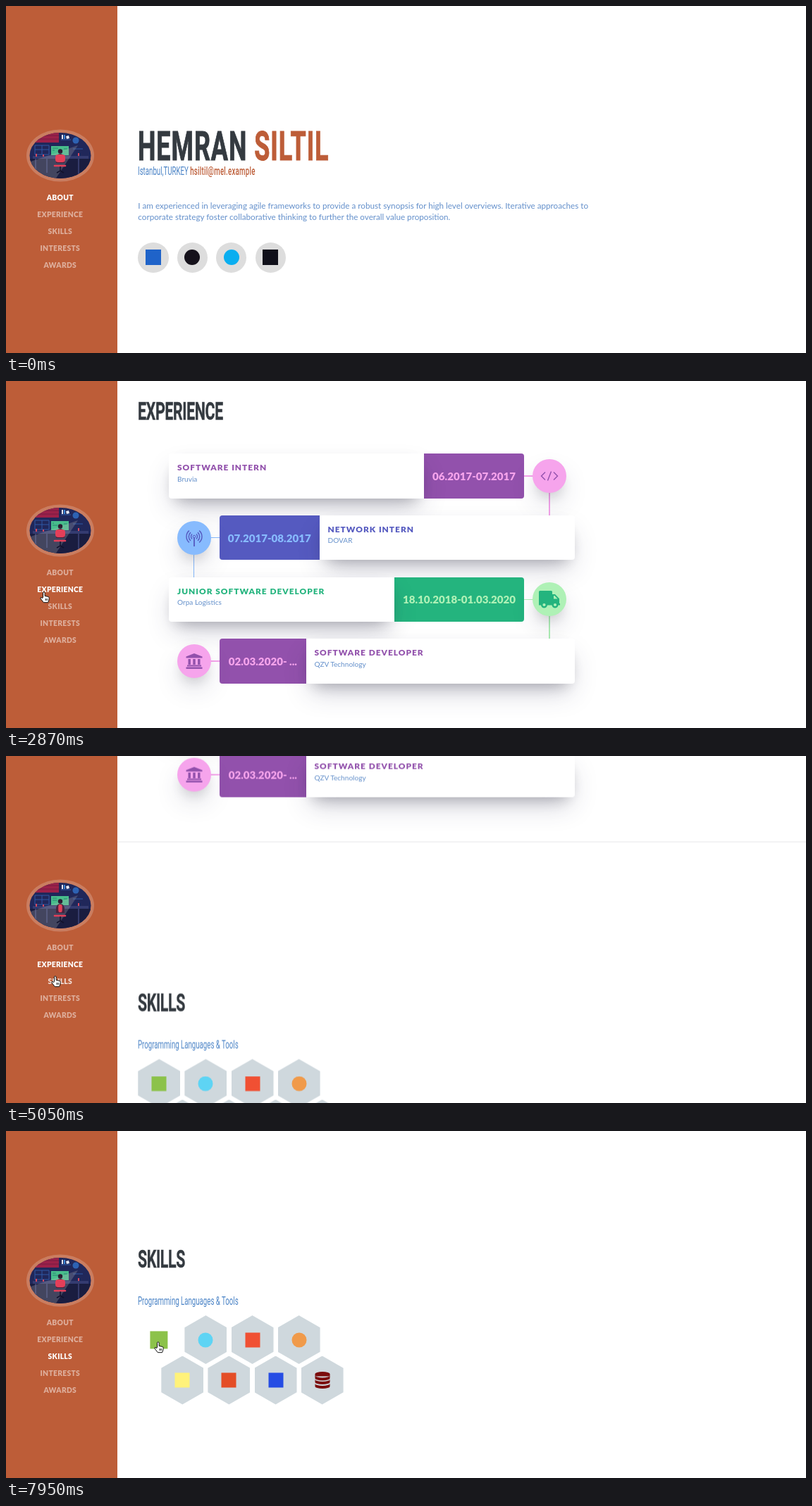
An HTML page for the animation above (8 s loop, 1135 px wide and 493 px high).

```html
<!DOCTYPE html>
<html lang="en">
<head>
<meta charset="utf-8">
<title>Resume</title>
<style>
html, body { margin: 0; width: 100%; height: 100%; overflow: hidden; background: #fff; }
body { position: relative; font-family: Lato, sans-serif; color: #6490cb; }
div, span.t, svg { position: absolute; }
svg { overflow: visible; }
#page { left: 0; top: 0; width: 1135px; will-change: transform; }
#side { left: 0; top: 0; width: 158px; height: 100%; background: #bd5d38; }
/* zero line height: "top" is the middle of the capitals */
.t { line-height: 0; white-space: pre; }
.mid { transform: translateX(-50%); }
.cond { font-family: Roboto, sans-serif; transform: scaleX(.62); transform-origin: 0 0; }
.name { font-size: 58px; font-weight: 700; letter-spacing: 1.5px; color: #343a40; -webkit-text-stroke: 1px; }
.head { font-size: 34.5px; font-weight: 700; letter-spacing: -.6px; color: #343a40; -webkit-text-stroke: .4px; }
.sub { font-size: 15.6px; color: #4a83c6; }
.rust { color: #bd5d38; }
.sub .rust { font-weight: 500; letter-spacing: .4px; }
.para { font-size: 11.68px; }
.nav { font-size: 10.3px; font-weight: 900; letter-spacing: .3px; color: #fff; }
.title { font-size: 11.9px; font-weight: 900; letter-spacing: 1px; }
.org { font-size: 10.1px; }
.date { font-size: 15.1px; font-weight: 900; }
.dot { border-radius: 50%; }
.hex { clip-path: polygon(50% 0, 100% 25%, 100% 75%, 50% 100%, 0 75%, 0 25%); }
.lift { box-shadow: 0 18px 36px -7px rgba(50,50,93,.25), 0 11px 22px -11px rgba(0,0,0,.3), 0 -7px 22px -5px rgba(0,0,0,.025); }
</style>
</head>
<body>
<div id="page"></div>
<div id="side">
  <svg width="158" height="493">
    <clipPath id="oval"><ellipse cx="77" cy="212.5" rx="43.5" ry="32.5"/></clipPath>
    <ellipse cx="77" cy="212.5" rx="48" ry="37" fill="#fff" fill-opacity=".2"/>
    <g clip-path="url(#oval)">
      <path d="M33 180h88v66H33z" fill="#20275a"/>
      <path d="M33 180h42v14H33z" fill="#9c2149"/>
      <path d="M33 184h42M33 189h42" stroke="#741a42"/>
      <path d="M78 190h14M41 198h20v13H41zM41 204h20M51 198v13M95 203h14" fill="none" stroke="#2f58a5"/>
      <path d="M79 183h2v6h-2zM85 185l4-1 1 4-4 1z" fill="#e6e9f5"/>
      <path d="M82 183h2v6h-2z" fill="#3d86d6"/>
      <circle cx="99" cy="191" r="4.5" fill="#2e62b3"/>
      <path d="M64 199h25v13H64z" fill="#48bd8c"/>
      <path id="code" d="M66 202h8M66 205h5M82 203h5" stroke="#2b8270"/>
      <path d="M38 213h79v4H38z" fill="#343b70"/>
      <path d="M33 217h88v30H33z" fill="#1a1d40"/>
      <path d="M42 217v22M58 217v20M103 217v22" stroke="#353b6b" stroke-width="2"/>
      <path d="M43 210v4M53 211v3M103 209v4" stroke="#d84960" stroke-width="2"/>
      <path d="M102 198L35 221 33 246H70z" fill="#b9b4b4" fill-opacity=".26"/>
      <path d="M71 218q0-8 6-8t6 8v5H71z" fill="#47233f"/>
      <circle cx="77" cy="206.5" r="3.2" fill="#2a1c32"/>
      <rect id="chair" x="70" y="211" width="14" height="11" rx="4" fill="#e33f59"/>
      <path d="M69 227h15" stroke="#e33f59" stroke-width="2.6" stroke-linecap="round"/>
      <path d="M77 228v7M72 237l5-3 5 3" fill="none" stroke="#11122b" stroke-width="1.5"/>
    </g>
  </svg>
</div>
<svg id="cursor" width="1" height="1" fill="#fff" stroke="#111" stroke-linejoin="round">
  <path id="arrow" d="M0 0v12l2.8-2.6 1.9 4.3 1.9-.9-1.9-4.1h3.8z"/>
  <path id="hand" d="M-1.5 7V1.2Q-1.5-.2-.2-.2T1.1 1.2V5.4l4.6 1q1.6.4 1.5 2L6.6 12l-1 2.7H-.7L-4.8 9.3q-.9-1.6.7-2l1.8 1.4zM2.2 9v3M4.2 9v3"/>
</svg>
<script>
const LOOP = 8000, EXP = 500, SKILLS = 1040;
const $ = id => document.getElementById(id);
const text = (x, y, cls, str, style = '') =>
  `<span class="t ${cls}" style="left:${x}px;top:${y}px;${style}">${str}</span>`;
const box = (x, y, w, h, color, cls = '', style = '') =>
  `<div class="${cls}" style="left:${x}px;top:${y}px;width:${w}px;height:${h}px;background:${color};${style}"></div>`;
// plain mark, centred on x, y
const mark = (x, y, size, color, round, id = '') =>
  `<svg id="${id}" style="left:${x}px;top:${y}px" width="1" height="1" fill="${color}">` +
  `<rect x="${-size / 2}" y="${-size / 2}" width="${size}" height="${size}" rx="${round ? size / 2 : 0}"/></svg>`;

const icons = {
  code: '<path d="M-6-5.5L-11.5 0-6 5.5M6-5.5L11.5 0 6 5.5M2.5-6.5L-2.5 6.5" stroke-width="1.4"/>',
  mast: '<circle cy="-2" r="1.8"/><path d="M0 0V12" stroke-width="1.8"/>' +
    [4.5, 7.7, 11].map(r => [-1, 1].map(s =>
      `<path d="M${s * r * .65} ${-2 - r * .76}A${r} ${r} 0 0 ${s > 0 ? 1 : 0} ${s * r * .65} ${-2 + r * .76}" stroke-width="1.4"/>`).join('')).join(''),
  truck: '<g stroke="none" fill="#24b47e"><path d="M-13.5-12H2.5q1.5 0 1.5 1.5V-7H8l6 6.2V6h1v2.5H-15V-10.5q0-1.5 1.5-1.5z"/>' +
    '<path d="M6-5H7.3L11.5-.5H6z" fill="#aff1b6"/>' +
    '<g stroke="#24b47e" stroke-width="2.4" fill="#aff1b6"><circle cx="-7.5" cy="8" r="3.3"/><circle cx="8" cy="8" r="3.3"/></g></g>',
  bank: '<g stroke="none" fill="#9251ac"><path d="M0-11L11.5-6.5V-4.5H-11.5V-6.5z"/>' +
    '<path d="M-8.5-3h3.4v8h-3.4zM-1.7-3h3.4v8h-3.4zM5.1-3h3.4v8H5.1zM-10 5.5h20v2h-20zM-11.5 8.5h23v2.5h-23z"/></g>'
};
const purple = ['#9251ac', '#f6a4ec'], blue = ['#555ac0', '#87bbfe'], green = ['#24b47e', '#aff1b6'];
const jobs = [
  ['SOFTWARE INTERN', 'Bruvia', '06.2017-07.2017', 142, purple, 'code'],
  ['NETWORK INTERN', 'DOVAR', '07.2017-08.2017', 141.5, blue, 'mast'],
  ['JUNIOR SOFTWARE DEVELOPER', 'Orpa Logistics', '18.10.2018-01.03.2020', 184, green, 'truck'],
  ['SOFTWARE DEVELOPER', 'QZV Technology', '02.03.2020- ...', 122.5, purple, 'bank']
];

function job([title, org, date, dateW, [dark, light], icon], i) {
  const odd = i % 2, y = EXP + 103.3 + i * 87.65, h = 63.5, mid = y + h / 2;
  const left = odd ? 303 : 231, width = 504 - dateW;
  const dateX = odd ? left : left + width, cardX = odd ? left + dateW : left;
  const cx = odd ? 266.5 : 771;
  const round = right => `border-radius:${right ? '0 4px 4px 0' : '4px 0 0 4px'}`;
  return (i < 3 ? box(cx - .75, mid + 24, 1.5, 32, light) : '') +
    box(odd ? 290 : 735, mid - .75, 13, 1.5, light) +
    box(dateX, y, dateW, h, dark, '', round(!odd)) +
    box(cardX, y, width, h, '#fff', 'lift', round(odd)) +
    text(dateX + dateW / 2, mid, 'mid date', date, `color:${light}`) +
    text(cardX + 12, y + 20, 'title', title, `color:${dark}`) +
    text(cardX + 12, y + 35.5, 'org', org) +
    box(cx - 24, mid - 24, 48, 48, light, 'dot lift') +
    `<svg style="left:${cx}px;top:${mid}px" width="1" height="1" fill="none" stroke="${dark}">${icons[icon]}</svg>`;
}

const social = [['#1f63c9', 0], ['#15111b', 1], ['#09aef0', 1], ['#10101a', 0]];
const skills = [['#8cc24a', 0], ['#5ed4f4', 1], ['#f05033', 0], ['#f09a4a', 1],
  ['#fff27a', 0], ['#e44d26', 0], ['#264de4', 0]];
const hexAt = i => [(i < 4 ? 187.3 : 220.3) + i % 4 * 66.1, SKILLS + (i < 4 ? 262 : 319.5)];

const disk = y => `<path d="M-10.5 ${y}a10.5 3 0 0 0 21 0v4a10.5 3 0 0 1-21 0z"/>`;
$('page').innerHTML =
  text(187, 198.5, 'cond name', 'HEMRAN <span class="rust">SILTIL</span>') +
  text(187, 235, 'cond sub', 'Istanbul,TURKEY <span class="rust">hsiltil@mel.example</span>') +
  text(187.3, 282.5, 'para', 'I am experienced in leveraging agile frameworks to provide a robust synopsis for high level overviews. Iterative approaches to') +
  text(187.3, 299, 'para', 'corporate strategy foster collaborative thinking to further the overall value proposition.') +
  social.map(([color, round], i) =>
    box(187.3 + i * 55.4, 335.5, 43.4, 43.4, '#dddddd', 'dot') + mark(209 + i * 55.4, 357.2, 22, color, round)).join('') +
  box(158, 493, 977, 1, '#e6e6e8') +
  text(187, EXP + 42.5, 'cond head', 'EXPERIENCE') +
  jobs.map(job).join('') +
  box(158, 993, 977, 1, '#e6e6e8') +
  text(187, SKILLS + 182, 'cond head', 'SKILLS') +
  text(187, SKILLS + 241.5, 'cond sub', 'Programming Languages &amp; Tools') +
  Array.from({ length: 8 }, (_, i) => box(...hexAt(i), 60, 69, '#cfd8dd', 'hex')).join('') +
  skills.map(([color, round], i) => {
    const [x, y] = hexAt(i);
    return mark(x + 30, y + 34.5, 21, color, round, 'skill' + i);
  }).join('') +
  `<svg style="left:448.6px;top:${SKILLS + 354}px" width="1" height="1" fill="#7b0d0d">` +
  `<ellipse cy="-9" rx="10.5" ry="3"/><path d="M-10.5-9h21v3.5h-21z"/>${[-6.5, -1, 5].map(disk).join('')}</svg>`;

const names = ['ABOUT', 'EXPERIENCE', 'SKILLS', 'INTERESTS', 'AWARDS'];
$('side').insertAdjacentHTML('beforeend',
  names.map((n, i) => text(76.8, 271.5 + i * 24, 'mid nav', n)).join(''));
const links = document.querySelectorAll('.nav');
const firstHex = document.querySelector('.hex');

const clamp = v => Math.min(1, Math.max(0, v));
const smooth = (t, a, b) => { const p = clamp((t - a) / (b - a)); return p * p * (3 - 2 * p); };
function expo(p) {
  if (p <= 0) return 0;
  if (p >= 1) return 1;
  return p < .5 ? 2 ** (20 * p - 11) : 1 - 2 ** (9 - 20 * p);
}

// pointer tip: time, x, y
const track = [[70, 732, 466], [950, 92, 312], [1250, 54, 299.5], [3500, 54, 299.5],
  [4150, 70, 313], [6100, 70, 313], [6800, 216, 300]];
function pointer(t) {
  let [, x, y] = track[0];
  for (let i = 1; i < track.length; i++) {
    const [a, x0, y0] = track[i - 1], [b, x1, y1] = track[i], p = smooth(t, a, b);
    x += (x1 - x0) * p;
    y += (y1 - y0) * p;
  }
  return [x, y];
}

function draw(t) {
  const scroll = EXP * expo((t - 1632) / 1000) + (SKILLS - EXP) * expo((t - 4517) / 1000);
  $('page').style.transform = `translateY(${-scroll}px)`;

  const [x, y] = pointer(t);
  const overNav = x > 40 && x < 112 && y > 260;
  const overHex = x > 187 && x < 247 && t > 6000;
  const hover = overNav ? Math.round((y - 271.5) / 24) : -1;
  const active = scroll < 480 ? 0 : scroll < 1015 ? 1 : 2;
  links.forEach((a, i) => a.style.opacity = i === active ? 1 : i === hover ? .8 : .5);

  $('cursor').style.cssText = `left:${x}px;top:${y}px;display:${t < 70 ? 'none' : 'block'}`;
  $('hand').style.display = overNav || overHex ? '' : 'none';
  $('arrow').style.display = overNav || overHex ? 'none' : '';

  firstHex.style.opacity = 1 - smooth(t, 6600, 6900);
  $('skill0').style.transform = `scale(${1 + .19 * smooth(t, 6650, 7200)})`;

  const turn = 1 - clamp(1.3 - Math.abs(t - 5750) / 1000);
  $('chair').setAttribute('transform', `translate(${77 * (1 - turn)}) scale(${turn} 1)`);
  $('code').setAttribute('d', `M66 202h${5 + 3 * Math.cos(t / 130)}M66 205h${6 - 3 * Math.cos(t / 170)}M82 203h5`);
}

(function frame() {
  draw(performance.now() % LOOP);
  requestAnimationFrame(frame);
})();
</script>
</body>
</html>
```
